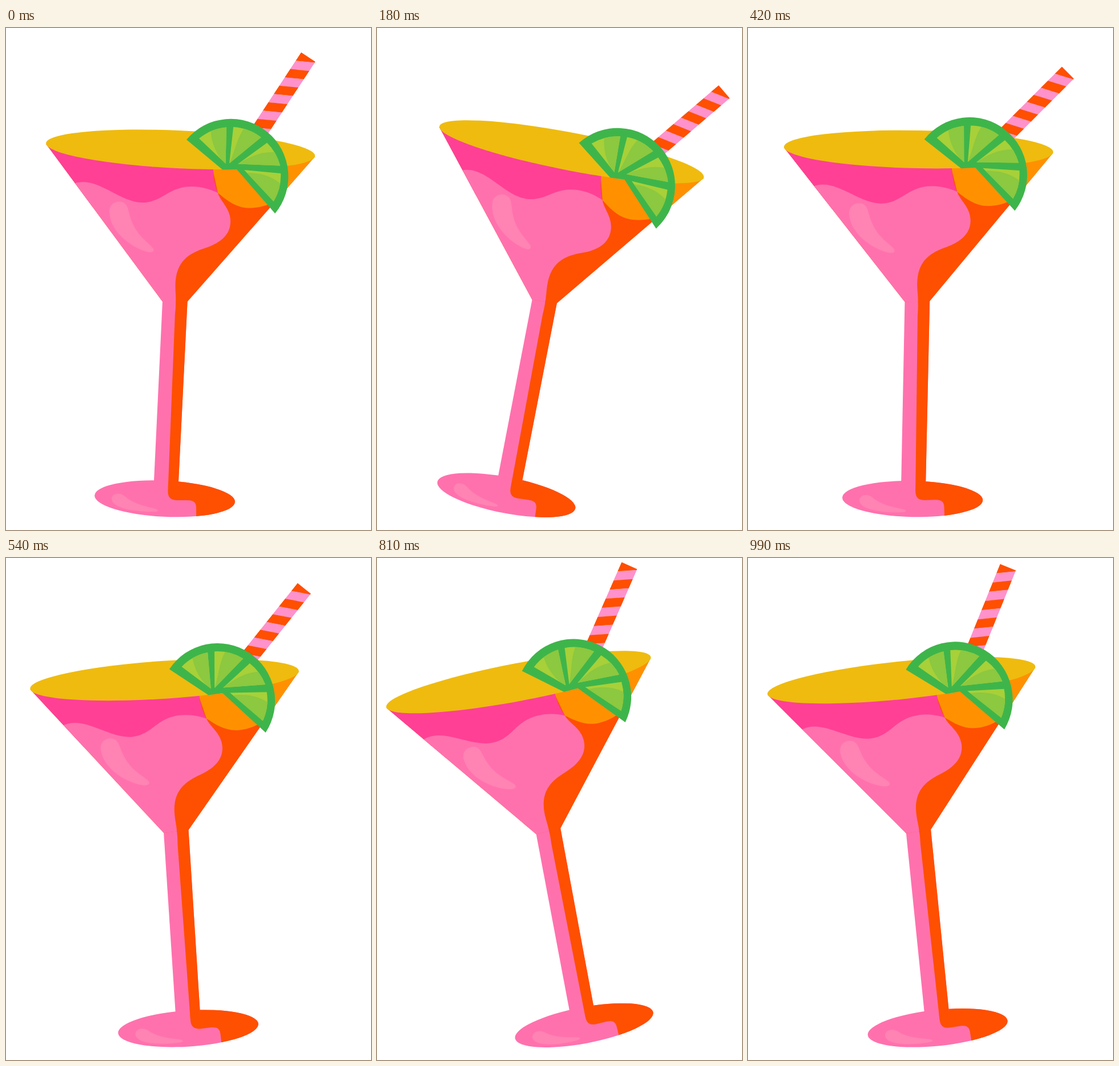
An HTML page that plays this animation: 639x877 px, repeating every 1020 ms.

```html
<!DOCTYPE html>
<html lang="en">
<head>
<meta charset="utf-8">
<title>Swaying cocktail</title>
<style>
  html, body { margin: 0; width: 100%; height: 100%; overflow: hidden; background: #fff; }
  svg { display: block; width: 100%; height: 100%; }
  .pink { fill: #ff71ad; }
  .hot { fill: #ff4095; }
  .red { fill: #ff4f00; }
  .amber { fill: #ff9100; }
  .gold { fill: #efbb0e; }
  .shine { fill: #ff83b3; }
  .rind { fill: #3eb54a; }
  .flesh { fill: #a8d038; }
  .shade { fill: #8cc840; }
</style>
</head>
<body>
<svg viewBox="0 0 639 877">
  <defs>
    <clipPath id="bowl"><path d="M70 202.5L274 478H317.7L541 224.5Z"/></clipPath>
    <clipPath id="foot"><ellipse cx="278" cy="822.3" rx="123" ry="31.5" transform="rotate(2.7 278 822.3)"/></clipPath>
    <clipPath id="straw-cut"><rect x="-15" y="-235" width="30" height="175"/></clipPath>
    <clipPath id="pulp">
      <path d="M338 193A87.5 87.5 0 0 1 386 173.5L384.5 237Z"/>
      <path d="M398 173A87.5 87.5 0 0 1 446.5 191L391 236.5Z"/>
      <path d="M457 200.5A87.5 87.5 0 0 1 480 240.5L406 237.5Z"/>
      <path d="M417 248L481 254A87.5 87.5 0 0 1 468.5 303Z"/>
    </clipPath>
  </defs>

  <g id="glass">
    <!-- foot and stem -->
    <g clip-path="url(#foot)">
      <path class="pink" d="M140 770H420V870H140Z"/>
      <path class="red" d="M284.5 780L283.5 808C283 820 288 825 300 825H318C330 825 333 830 333 839V865H420V780Z"/>
    </g>
    <path class="pink" d="M274 477H317.7L301.6 800H258.6Z"/>
    <path class="red" d="M297 476.5C297.5 489 296 497 295.7 505L283.8 801H301.6L317.7 477Z"/>
    <path class="shine" d="M185 822C186 812 200 811 208 818C222 831 245 836 262 840C269 843 266 845 258 845C232 846 184 840 185 822Z"/>

    <!-- bowl -->
    <g clip-path="url(#bowl)">
      <path class="red" d="M40 180H560V480H40Z"/>
      <path class="amber" d="M362 200V247L371 288C385 300 402 314 425 314.5C452 314.5 468 305 510 288L560 200Z"/>
      <path class="hot" d="M40 180H362L363 247C363 262 366 276 371 288L240 330L90 300Z"/>
      <path class="pink" d="M90 282L119 272C158 257 197 304 238 305C274 305 284 277 325 277C345 277 360 283 371 288C375 303 393 315 393 338C393 362 374 376 350 384C322 393 297 406 296.5 450C296.5 462 297.8 468 297 480H60Z"/>
    </g>
    <path class="shine" d="M181 322C180 308 192 301 203 304C216 308 213 322 222 342C232 364 246 372 257 384C262 391 255 393 247 391C220 384 182 356 181 322Z"/>
    <ellipse class="gold" cx="305.5" cy="212.3" rx="235.7" ry="33" transform="rotate(2.7 305.5 212.3)"/>

    <g id="straw"><g id="stripes" clip-path="url(#straw-cut)"></g></g>

    <!-- lime -->
    <path class="rind" d="M316 195A100.7 100.7 0 0 1 471 324L404 247L379 247.5Z"/>
    <g clip-path="url(#pulp)">
      <path class="flesh" d="M320 160H500V320H320Z"/>
      <path class="shade" d="M358 170C358 200 368 222 385 238H390V165H358Z"/>
      <path class="shade" d="M421 170C405 188 402 212 391 237L452 190Z"/>
      <path class="shade" d="M474 217C448 215 428 224 406 237.5L484 243Z"/>
      <path class="shade" d="M416 253C444 252 464 258 482 273L475 315H460Z"/>
    </g>
  </g>
</svg>
<script>
  const LOOP = 1020, STEP = 30;
  const PIVOT = '295.4 460', HINGE = '399.8 247';

  // [ms, degrees]
  const sway = [[0, 0], [180, 8.2], [750, -15.05], [990, -8.55]];
  const lean = [[0, 33.4], [180, 41.3], [420, 46.6], [540, 45.2], [660, 42.1], [810, 37.1], [990, 30.6]];

  const $ = id => document.getElementById(id);

  function segment(keys, t) {
    let i = 0;
    while (i < keys.length - 2 && t >= keys[i + 1][0]) i++;
    return i;
  }

  function linear(keys, t) {
    const i = segment(keys, t), [a, x] = keys[i], [b, y] = keys[i + 1];
    return x + (y - x) * (t - a) / (b - a);
  }

  function slope(keys, i) {
    const a = keys[Math.max(0, i - 1)], b = keys[Math.min(keys.length - 1, i + 1)];
    return (b[1] - a[1]) / (b[0] - a[0]);
  }

  // cubic Hermite through the keys
  function smooth(keys, t) {
    const i = segment(keys, t), [a, x] = keys[i], [b, y] = keys[i + 1];
    const h = b - a, u = (t - a) / h, v = 1 - u;
    return x * v * v * (1 + 2 * u) + y * u * u * (3 - 2 * u)
      + h * u * v * (slope(keys, i) * v - slope(keys, i + 1) * u);
  }

  function buildStraw() {
    const band = 17.4, drop = 15.8;
    for (let i = 0; i < 11; i++) {
      const y = -235 + i * band, end = y + band + 0.4;
      const p = document.createElementNS('http://www.w3.org/2000/svg', 'path');
      p.setAttribute('d', `M-15 ${y}L15 ${y - drop}V${end - drop}L-15 ${end}Z`);
      p.setAttribute('fill', i % 2 ? '#ff92cb' : '#ff4f00');
      $('stripes').append(p);
    }
  }

  function draw(now) {
    const t = Math.floor((now % LOOP) / STEP) * STEP;
    $('glass').setAttribute('transform', `rotate(${linear(sway, t)} ${PIVOT})`);
    $('straw').setAttribute('transform', `translate(${HINGE}) rotate(${smooth(lean, t)})`);
  }

  buildStraw();
  const start = performance.now();
  draw(0);
  requestAnimationFrame(function tick() {
    draw(performance.now() - start);
    requestAnimationFrame(tick);
  });
</script>
</body>
</html>
```
